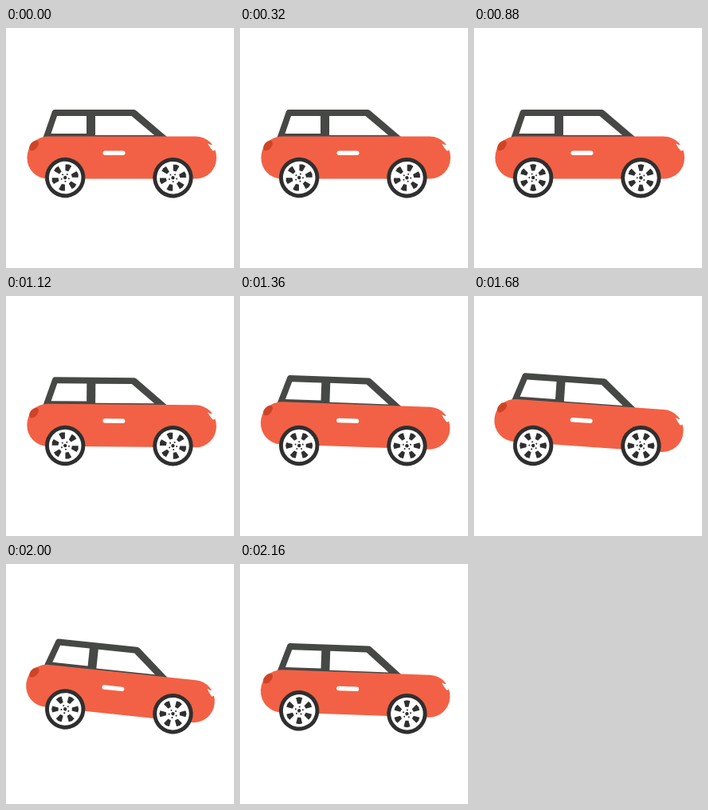
An HTML page with a canvas for the animation above (2240 ms loop, 286x300 px).

```html
<!DOCTYPE html>
<html lang="en">
<head>
<meta charset="utf-8">
<title>Car</title>
<style>
  html, body { margin: 0; width: 100%; height: 100%; overflow: hidden; background: #fff; }
  canvas { display: block; width: 286px; height: 300px; }
</style>
</head>
<body>
<canvas id="stage"></canvas>
<script>
const W = 286, H = 300, LOOP = 2240, STEP = 80;
const DARK = '#464845', TYRE = '#2f2f2f', RED = '#f26145', WHITE = '#fff';
const TAU = Math.PI * 2, RAD = Math.PI / 180;
const canvas = document.getElementById('stage');
const ctx = canvas.getContext('2d');
const ratio = window.devicePixelRatio || 1;
canvas.width = W * ratio;
canvas.height = H * ratio;

function fill(color, path) {
  ctx.fillStyle = color;
  ctx.beginPath();
  path();
  ctx.fill();
}

function poly(color, points) {
  fill(color, () => {
    points.forEach(([x, y]) => ctx.lineTo(x, y));
    ctx.closePath();
  });
}

function disc(color, r, x = 0, y = 0) {
  fill(color, () => ctx.arc(x, y, r, 0, TAU));
}

function drawBody(tilt) {
  ctx.save();
  ctx.translate(145, 145);
  ctx.rotate(tilt * RAD);
  ctx.translate(-145, -145);

  fill(DARK, () => {
    ctx.moveTo(46.5, 137);
    ctx.lineTo(58, 104);
    ctx.quadraticCurveTo(59, 102, 61, 102);
    ctx.lineTo(160, 102);
    ctx.quadraticCurveTo(161.5, 102, 163, 103);
    ctx.lineTo(203, 137);
    ctx.closePath();
  });
  poly(WHITE, [[64, 110], [101, 110], [101, 132], [56.5, 132]]);
  poly(WHITE, [[112, 110], [157.5, 110], [186, 134], [112, 134]]);

  fill(RED, () => ctx.roundRect(26.5, 135.5, 237.5, 53, 26));
  fill('#cf4426', () => ctx.ellipse(35, 147, 7.5, 4.5, -50 * RAD, 0, TAU));
  fill(WHITE, () => {
    ctx.moveTo(253, 144.5);
    ctx.quadraticCurveTo(257, 147, 262.5, 146);
    ctx.lineTo(263.5, 150);
    ctx.quadraticCurveTo(262, 154, 259.5, 153.5);
    ctx.quadraticCurveTo(256, 150, 253, 144.5);
  });
  fill(WHITE, () => ctx.roundRect(121.5, 153.5, 28, 5.5, 2.7));
  ctx.restore();
}

function drawWheel(x, y, angle) {
  ctx.save();
  ctx.translate(x, y);
  ctx.rotate(angle);
  disc(TYRE, 25.2);
  disc(WHITE, 20.3);
  for (let i = 0; i < 6; i++) {
    poly(TYRE, [[-2, -8.5], [-4, -16], [0, -17], [4, -16], [2, -8.5]]);
    ctx.rotate(TAU / 6);
  }
  disc(TYRE, 2.2);
  for (let i = 0; i < 5; i++) {
    const a = i * TAU / 5;
    disc(TYRE, 1, 4.8 * Math.cos(a), 4.8 * Math.sin(a));
  }
  ctx.restore();
}

// Rises slowly, then drops back four times as fast.
function tiltAt(t) {
  if (t < 1040) return 0;
  return t <= 2000 ? (t - 1040) / 160 : (LOOP - t) / 40;
}

// The rear wheel leaves the ground and lands as the loop ends.
function hopAt(t) {
  const p = Math.max(0, (t - 1840) / (LOOP - 1840));
  return 5.8 * 4 * p * (1 - p);
}

function draw(now) {
  const t = Math.floor((now % LOOP) / STEP) * STEP;
  const spin = (15 + 15 * t / STEP) * RAD;
  ctx.setTransform(ratio, 0, 0, ratio, 0, 0);
  ctx.fillStyle = WHITE;
  ctx.fillRect(0, 0, W, H);
  drawBody(tiltAt(t));
  drawWheel(74.2, 187, spin);
  drawWheel(209.4, 187.2, spin);
  requestAnimationFrame(draw);
}

function drawWheels(t, spin) {
  drawWheel(74.2, 187 - hopAt(t), spin);
  drawWheel(209.4, 187.2, spin);
}

draw = function (now) {
  const t = Math.floor((now % LOOP) / STEP) * STEP;
  ctx.setTransform(ratio, 0, 0, ratio, 0, 0);
  ctx.fillStyle = WHITE;
  ctx.fillRect(0, 0, W, H);
  drawBody(tiltAt(t));
  drawWheels(t, (15 + 15 * t / STEP) * RAD);
  requestAnimationFrame(draw);
};

draw(0);
</script>
</body>
</html>
```
